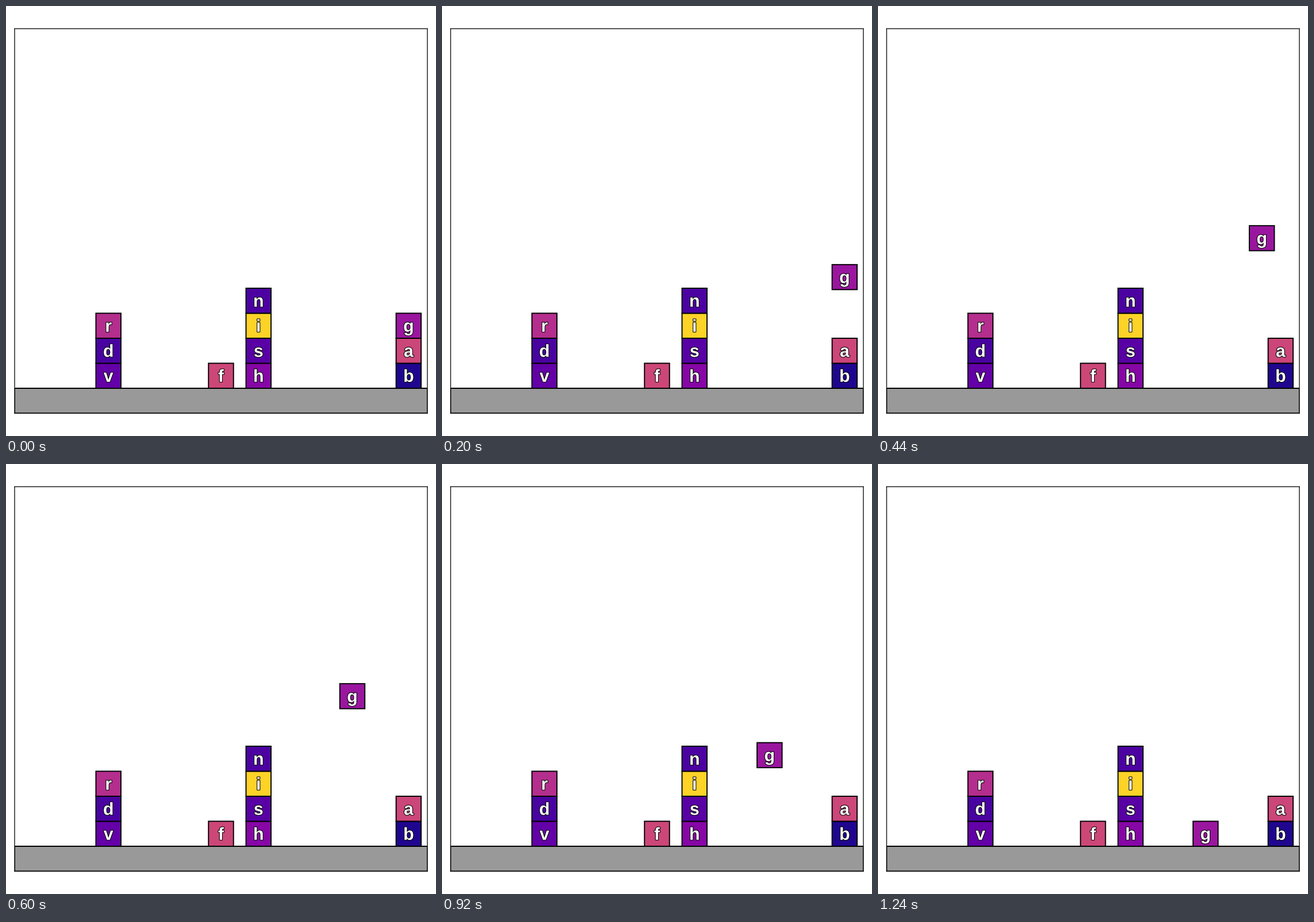
Write a matplotlib script that moves like this. It is 748 px wide and 748 px high and loops after 1.28 s.

```python
import numpy as np
import matplotlib.pyplot as plt
from matplotlib.animation import FuncAnimation
from matplotlib.patches import PathPatch, Rectangle
from matplotlib.patheffects import withStroke
from matplotlib.textpath import TextPath
from matplotlib.transforms import Affine2D

STAGE = 748
PX = 0.72                       # points per pixel at 100 dpi
LEFT, RIGHT, TOP, BOTTOM = 15, 733, 39.5, 708.5
WIDTH = 16.5                    # stage width in block units
UNIT = (RIGHT - LEFT) / WIDTH
FONT = {"family": "Liberation Sans", "weight": "bold"}
FONT_SIZE = 0.7
BASELINE = 0.5 - 0.3465 * FONT_SIZE

COLORS = {
    "v": "#6400a7", "d": "#4903a0", "r": "#b42e8d", "f": "#cc4778",
    "h": "#8606a6", "s": "#5901a5", "i": "#fdd328", "n": "#4c02a1",
    "b": "#20068f", "a": "#cb4679", "g": "#9a169f",
}
TOWERS = {3.25: "vdr", 7.75: "f", 9.25: "hsin", 15.25: "bag"}

# Lift, carry and lower: the frame and place of each turning point
TURNS = [0, 9, 17, 31]
PATH_X = [15.25, 15.25, 12.25, 12.25]
PATH_Y = [2, 5.5, 5.5, 0]

fig = plt.figure(figsize=(STAGE / 100, STAGE / 100), dpi=100, facecolor="white")
ax = fig.add_axes([LEFT / STAGE, 1 - BOTTOM / STAGE,
                   (RIGHT - LEFT) / STAGE, (BOTTOM - TOP) / STAGE])
ax.set(xlim=(0, WIDTH), ylim=(-1, (BOTTOM - TOP) / UNIT - 1), xticks=[], yticks=[])
for spine in ax.spines.values():
    spine.set(linewidth=1.3 * PX, color="black", snap=False)

ax.add_patch(Rectangle((0, -1), WIDTH, 1, facecolor="#999999",
                       edgecolor="black", linewidth=2 * PX, snap=False))


def text_path(text):
    return TextPath((0, 0), text, size=FONT_SIZE, prop=FONT)


def advance(char):
    """Pen advance of one letter, measured with a mark after it."""
    return text_path(char + "|").vertices[:, 0].max() - text_path("|").vertices[:, 0].max()


class Block:
    def __init__(self, name, x, y):
        self.box = ax.add_patch(Rectangle(
            (x, y), 1, 1, facecolor=COLORS[name], edgecolor="black",
            linewidth=1.9 * PX, snap=False))
        self.indent = 0.5 - advance(name) / 2
        self.letter = ax.add_patch(PathPatch(
            text_path(name), facecolor="white", linewidth=0, joinstyle="round",
            snap=False,
            path_effects=[withStroke(linewidth=2.1 * PX, foreground="black")]))
        self.move(x, y)

    def move(self, x, y):
        self.box.set_xy((x, y))
        shift = Affine2D().translate(x + self.indent, y + BASELINE)
        self.letter.set_transform(shift + ax.transData)


blocks = {name: Block(name, x, level)
          for x, tower in TOWERS.items()
          for level, name in enumerate(tower)}


def update(frame):
    blocks["g"].move(np.interp(frame, TURNS, PATH_X),
                     np.interp(frame, TURNS, PATH_Y))
    return blocks["g"].box, blocks["g"].letter


anim = FuncAnimation(fig, update, frames=32, interval=40, repeat=True)
plt.show()
```
